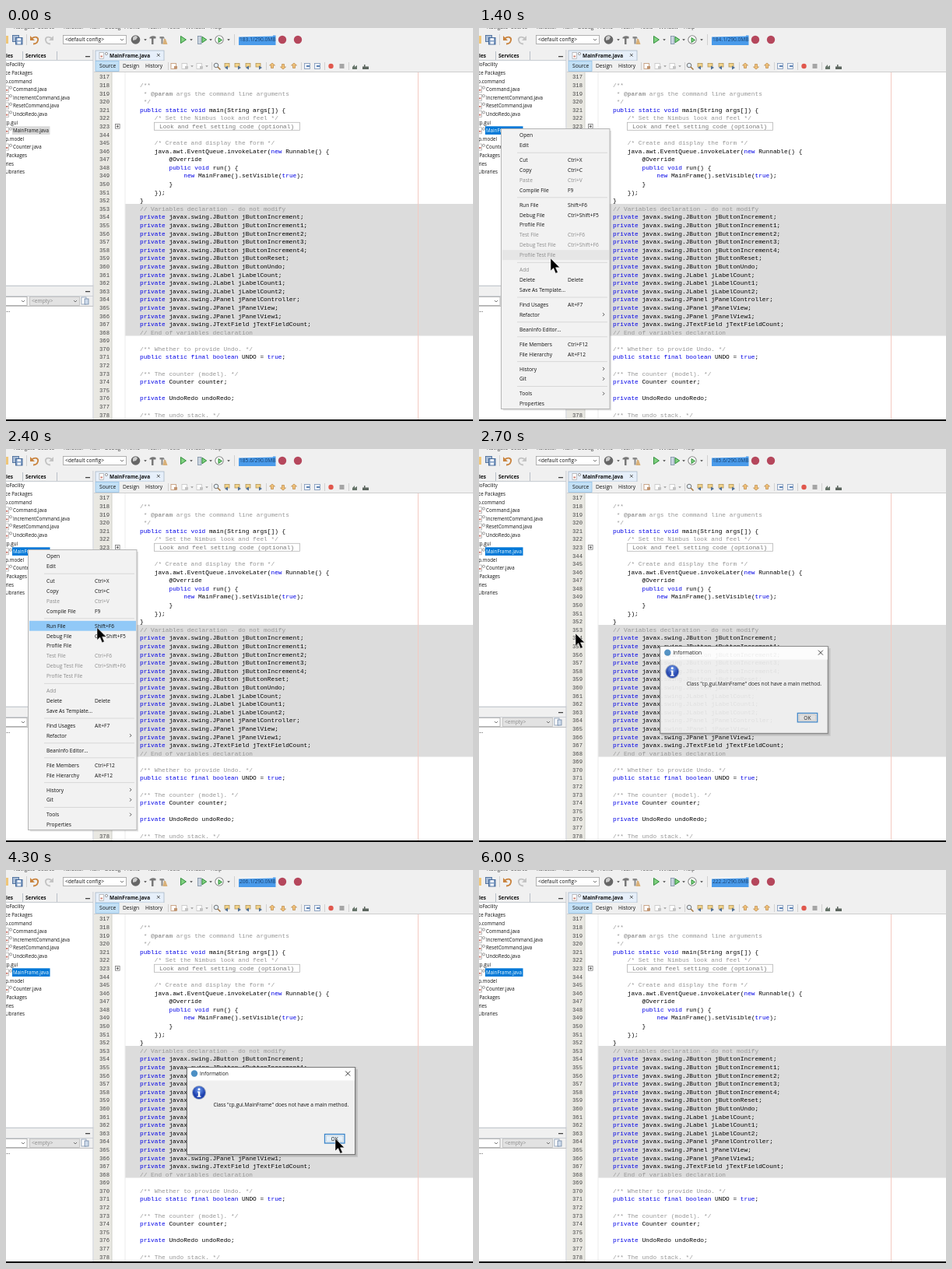
An HTML page that plays this animation: 600x505 px, repeating every 6.1 s.

```html
<!DOCTYPE html>
<html lang="en">
<head>
<meta charset="utf-8">
<title>IDE run file</title>
<style>
html, body { margin: 0; width: 100%; height: 100%; overflow: hidden; background: #fff; }
svg { display: block; width: 600px; height: 505px; }
text { font: 6.65px "Open Sans", "Noto Sans", sans-serif; white-space: pre; fill: #111; }
.code { font: 7.81px "Liberation Mono", monospace; }
.num { font: 7.2px "Liberation Mono", monospace; fill: #444; }
.tree { font-size: 6.2px; }
.b { font-weight: 700; font-size: 6.5px; }
.off { fill: #8b8b8b; }
</style>
</head>
<body>
<script>
const LOOP = 6100, STEP = 100;

// ---- markup helpers
const rect = (x, y, w, h, fill, more = '') =>
  `<rect x="${x}" y="${y}" width="${w}" height="${h}" fill="${fill}" ${more}/>`;
const path = (d, fill, more = '') => `<path d="${d}" fill="${fill}" ${more}/>`;
const line = (d, color, w = 1) => path(d, 'none', `stroke="${color}" stroke-width="${w}"`);
const dot = (x, y, r, fill, more = '') => `<circle cx="${x}" cy="${y}" r="${r}" fill="${fill}" ${more}/>`;
const text = (x, y, s, cls = '', more = '') =>
  `<text x="${x}" y="${y}" class="${cls}" ${more}>${s.replace(/</g, '&lt;')}</text>`;
const group = (id, body) => `<g id="${id}">${body}</g>`;
const drop = (x, y, c = '#444') => path(`M${x - 1.8} ${y - .8}h3.6l-1.8 2z`, c);
const chevron = (x, y) => line(`M${x - 2} ${y - 1}l2 2 2-2`, '#555', .8);
const vline = (x, y, h, c = '#d0d0d0') => rect(x, y, 1, h, c);

// ---- main toolbar
function toolbar() {
  const menus = [['Navigate', 10], ['Source', 41], ['Refactor', 74], ['Run', 108], ['Debug', 127],
    ['Profile', 152], ['Team', 182], ['Tools', 207], ['Window', 231], ['Help', 263]];
  const play = (x, y, s) => path(`M${x} ${y - s}v${2 * s}l${1.5 * s}-${s}z`, '#7fd07f', 'stroke="#2f8f3a" stroke-width="1"');
  return rect(0, 0, 600, 28, '#f0f0f0') +
    menus.map(([s, x]) => text(x, 1.2, s, '', 'opacity=".8"')).join('') +
    rect(0, 10, 3, 10, '#efc678') +
    rect(8.5, 9.5, 8, 8, '#a9bdd6', 'stroke="#4d6f9c" stroke-width=".9"') +
    rect(12.5, 12.5, 8.5, 8.5, '#7f9dc4', 'stroke="#3a5f92" stroke-width=".9"') +
    rect(14.5, 13, 4.5, 3, '#f2f5fa') + rect(14.5, 17.5, 4.5, 3, '#f2f5fa') +
    vline(26, 8, 14) +
    line('M33 13.5c5-4 9-1 8 2.500s-4 4.500-6 4.500', '#c9843f', 1.8) + path('M31 10v6h6z', '#c9843f') +
    line('M59 13.5c-5-4-9-1-8 2.500s4 4.500 6 4.500', '#c3c3c3', 1.8) + path('M61 10v6h-6z', '#c3c3c3') +
    rect(73.5, 9.5, 81, 11, '#fff', 'stroke="#a0a0a0" stroke-width=".8"') +
    text(76, 17.2, '<default config>') + chevron(149, 15) +
    dot(166.5, 15, 5.8, '#666') + path('M163 12q4-4 6 0l-2 3-4 1z', '#ccc') + drop(179, 15) +
    path('M184.500 12q3-3 8-1v2.500h-3v7.500h-2.500v-7.500h-2.500z', '#777') +
    path('M197.500 11h5l1.500 2.500h-2.500v7h-2v-7h-2z', '#888') + path('M203 14h2l2.500 7h-6z', '#d9b077') +
    play(224.5, 15, 4.6) + drop(238, 15) +
    rect(246.5, 10.5, 4.5, 10, '#c9d3df', 'stroke="#7c8ea3" stroke-width=".8"') + play(252, 15, 3.8) + drop(263, 15) +
    dot(274, 15, 5.2, '#fff', 'stroke="#8a8a8a" stroke-width="1.1"') + play(273, 15.5, 3) + drop(286, 15) +
    vline(293, 8, 14) +
    rect(298.5, 8.5, 48.5, 13.5, '#f3f3f3') + path('M299 11.500L343 10.500V9.500H346.500V22H299z', '#4a9bea') +
    text(300, 17.2, '', '', 'id="mem" style="fill:#17406f"') +
    dot(355, 15, 5.2, '#b5475c') + dot(375, 15, 5.2, '#b5475c');
}

// ---- left side panels
function side() {
  const cut = [['UndoFacility', 24, 47], ['Source Packages', 34, 57.6], ['cp.command', 33, 68.2],
    ['cp.gui', 15, 121.2], ['cp.model', 23, 142.4], ['Test Packages', 27, 163.6],
    ['Libraries', 10, 174.2], ['Test Libraries', 24, 184.8]];
  const files = [['Command', 78.8], ['IncrementCommand', 89.4], ['ResetCommand', 100],
    ['UndoRedo', 110.6], ['MainFrame', 131.8], ['Counter', 153]];
  const icon = y => rect(-1, y - 4, 4.5, 8, '#fff', 'stroke="#a5a5a5" stroke-width=".7"') +
    rect(0, y, 2.5, 2, '#cf8378') + dot(6, y - 2.2, 1.6, '#fff', 'stroke="#777" stroke-width=".7"');
  return rect(0, 28, 113, 475, '#fff') +
    rect(0, 28, 112, 14, '#f0f0f0') + vline(21, 30, 11, '#b9c0c8') + vline(65, 30, 11, '#b9c0c8') +
    rect(0, 41.3, 112, .8, '#b9c0c8') +
    text(9, 38, 'Files', 'b', 'text-anchor="end"') + text(25, 38, 'Services', 'b') + rect(102, 36, 6, 1.3, '#444') +
    cut.map(([s, x, y]) => text(x, y + 2.3, s, 'tree', 'text-anchor="end"')).join('') +
    rect(8, 126.3, 48.5, 10.6, '#d9d9d9', 'id="sel"') +
    files.map(([s, y]) => icon(y) + text(9, y + 2.3, s + '.java', 'tree', s === 'MainFrame' ? 'id="picked"' : '')).join('') +
    rect(0, 330, 113, 28, '#f0f0f0') + rect(0, 331, 112, .8, '#b9c0c8') + rect(0, 344, 112, .8, '#c6cbd1') +
    rect(102, 338, 6, 1.3, '#444') +
    rect(-5, 345.5, 32, 11, '#fff', 'stroke="#a5a5a5" stroke-width=".8"') + chevron(22, 351) +
    rect(30.5, 345.5, 64, 11, '#e2e2e2', 'stroke="#bebebe" stroke-width=".8"') +
    text(33, 353.4, '<empty>', 'off') + chevron(89, 351) +
    rect(97, 346, 6, 9, '#fff', 'stroke="#8297b0" stroke-width=".8"') + rect(101, 348, 5, 7, '#cfdcec', 'stroke="#6f87a5" stroke-width=".8"') +
    rect(0, 357, 112, .8, '#b5b5b5') + text(0, 364.5, '...') +
    vline(111.5, 28, 475, '#c2c6cb');
}

// ---- editor
const KEYWORDS = /\b(public|private|static|final|void|boolean|new|true)\b/g;
const field = (type, name) => `private javax.swing.J${type} j${name};`;
const SOURCE = [
  '', '/**', ' * @param args the command line arguments', ' */',
  'public static void main(String args[]) {', '    /* Set the Nimbus look and feel */', '',
  '', '    /* Create and display the form */',
  '    java.awt.EventQueue.invokeLater(new Runnable() {', '        @Override', '        public void run() {',
  '            new MainFrame().setVisible(true);', '        }', '    });', '}',
  '// Variables declaration - do not modify',
  ...['Increment', 'Increment1', 'Increment2', 'Increment3', 'Increment4', 'Reset', 'Undo']
    .map(s => field('Button', 'Button' + s)),
  ...['', '1', '2'].map(s => field('Label', 'LabelCount' + s)),
  ...['Controller', 'View', 'View1'].map(s => field('Panel', 'Panel' + s)),
  field('TextField', 'TextFieldCount'),
  '// End of variables declaration', '',
  '/** Whether to provide Undo. */', 'public static final boolean UNDO = true;', '',
  '/** The counter (model). */', 'private Counter counter;', '',
  'private UndoRedo undoRedo;', '', '/** The undo stack. */'
];

function codeLine(s, i) {
  const y = (65.4 + i * 10.59).toFixed(2);
  const body = s.trimStart(), x = 172 + (s.length - body.length) * 4.686;
  const note = /^[/*]/.test(body);
  const marked = note
    ? body.replace('@param', '<tspan font-weight="700">@param</tspan>')
    : body.replace(KEYWORDS, '<tspan fill="#0000e6">$1</tspan>');
  return text(120, y, String(i < 7 ? 317 + i : 337 + i), 'num') +
    `<text x="${x}" y="${y}" class="code" style="fill:${note ? '#969696' : '#000'}">${marked}</text>`;
}

function editTools() {
  const page = (x, c) => rect(x - 4, 45.5, 6.5, 7, '#fff', `stroke="${c}" stroke-width=".8"`) + rect(x, 49, 4, 3.5, c);
  const mark = (x, dir) => rect(x - 4, 45.5, 6, 4.5, '#f3d48a', 'stroke="#a98a4a" stroke-width=".7"') +
    path(`M${x + 4 * dir} 51l${-4 * dir}-2.500v5z`, '#4f6f96');
  const slant = (x, dir) => path(`M${x - 3.5} ${49 - dir}l3.500 ${-3 * dir} 3.500 ${3 * dir}h-2v${3.5 * dir}h-3v${-3.5 * dir}z`,
    '#f0c27a', 'stroke="#b98542" stroke-width=".7"');
  const shift = x => rect(x - 3.5, 45.5, 7, 7, '#eef2f8', 'stroke="#7c94b8" stroke-width=".8"') + rect(x - 1, 48, 4, 2, '#5d83b5');
  return page(216, '#c0936f') + page(230, '#c4c4c4') + drop(239, 49, '#999') + page(249, '#c4c4c4') + drop(258, 49, '#999') +
    [208, 264, 334, 379, 409, 440].map(x => vline(x, 44, 10)).join('') +
    dot(270, 48, 2.8, '#e4eef8', 'stroke="#666" stroke-width=".9"') + line('M272 50l3.500 3.500', '#a5783f', 1.5) +
    mark(285, -1) + mark(298, 1) + mark(312, -1) + mark(325, 1) +
    slant(342, 1) + slant(356, -1) + slant(370, 1) + shift(387) + shift(400) +
    dot(417.5, 49, 3.2, '#e0574c') + rect(428.500, 46, 6, 6, '#a5a5a5') +
    path('M445 53v-3l3-3v3l3-2v5z', '#66756a') + path('M458 53v-3.500h8v3.500z', '#5d665f') + rect(460, 47, 1.5, 3, '#5d665f');
}

function editor() {
  return rect(113, 28, 487, 29, '#f0f0f0') +
    rect(115, 29, 88, 13, '#e6effa', 'stroke="#a9b8c9" stroke-width=".8"') +
    rect(120, 31.5, 5.5, 8, '#fff', 'stroke="#a5a5a5" stroke-width=".7"') + rect(121.5, 35.5, 2.5, 2, '#cf8378') +
    dot(129, 33, 1.6, '#fff', 'stroke="#777" stroke-width=".7"') +
    text(133, 37.8, 'MainFrame.java', 'b') + line('M194 33l3.600 3.600m0-3.600l-3.600 3.600', '#444', .9) +
    rect(113, 42, 487, 14.5, '#f0f0f0') +
    rect(115, 42.5, 30, 13, '#c2e0f6', 'stroke="#93c1e6" stroke-width=".8"') +
    text(120, 51.4, 'Source') + text(150, 51.4, 'Design') + text(179, 51.4, 'History') + editTools() +
    rect(113, 56, 487, .8, '#c6c6c6') + rect(113, 57, 487, 446, '#fff') +
    rect(113, 57, 23, 446, '#e9e8e2') + vline(135.5, 57, 446, '#d0cfca') +
    rect(153, 226, 447, 169.5, '#dcdcdc') + vline(152.5, 57, 446, '#ebebeb') +
    vline(529, 57, 446, '#f3c9c2') +
    SOURCE.map(codeLine).join('') +
    rect(190.5, 121.3, 187, 10, '#fff', 'stroke="#b5b5b5" stroke-width=".8"') +
    text(197, 129, 'Look and feel setting code (optional)', 'code', 'style="fill:#777"') +
    rect(140.5, 123.5, 5.6, 5.6, '#fff', 'stroke="#777" stroke-width=".8"') + line('M141.6 126.3h3.4m-1.7-1.7v3.4', '#444', .8);
}

// ---- context menu: "-" separates, "!" disables, ">" has a submenu
const MENU = `Open;Edit;-;Cut|Ctrl+X;Copy|Ctrl+C;!Paste|Ctrl+V;Compile File|F9;-;Run File|Shift+F6;Debug File|Ctrl+Shift+F5;
Profile File;!Test File|Ctrl+F6;!Debug Test File|Ctrl+Shift+F6;!Profile Test File;-;!Add;Delete|Delete;Save As Template...;-;
Find Usages|Alt+F7;Refactor|>;-;BeanInfo Editor...;-;File Members|Ctrl+F12;File Hierarchy|Alt+F12;-;History|>;Git|>;-;
Tools|>;Properties`.replace(/\n/g, '').split(';');
const ROW = 12.9, rows = [];

function menu() {
  let y = 131.3, out = '';
  for (const item of MENU) {
    if (item === '-') {
      out += rect(49, y + 2.7, 116, .8, '#d2d2d2');
      y += 6.05;
      continue;
    }
    const off = item[0] === '!', [label, key = ''] = item.replace('!', '').split('|');
    const base = y + ROW / 2 + 2.4, cls = off ? 'off' : '';
    rows.push({ y, off });
    out += text(52, base, label, cls) +
      (key === '>' ? line(`M159 ${base - 4.6}l2 2-2 2`, '#333', .8) : text(114, base, key, cls));
    y += ROW;
  }
  return rect(31, 132, 139, 359.5, '#000', 'opacity=".12"') +
    rect(28.5, 129.5, 139.5, 360, '#f2f2f2', 'stroke="#b5b5b5"') +
    rect(30, 0, 137, ROW, '#91c9f7', 'id="hover"') + out;
}

function dialog() {
  return rect(234, 256, 218, 113, '#000', 'opacity=".1"') + rect(231, 253, 219.5, 114.5, '#000', 'opacity=".1"') +
    rect(232.5, 253.5, 216, 112, '#f0f0f0', 'stroke="#777"') + rect(233, 254, 215, 16.5, '#fff') +
    dot(242, 261.5, 4.2, '#4c8fc4') + text(249, 264, 'Information') +
    line('M436.2 258.5l6 6m0-6l-6 6', '#222', .9) +
    dot(248, 286, 9, '#9aa7bd') + dot(248, 286, 8, 'url(#ball)') +
    dot(248, 281.7, 1.5, '#fff') + path('M246 284.4h3.3v6h1.2v1.4h-5v-1.4h1.4v-4.6H246z', '#fff') +
    text(266.5, 304.4, 'Class "cp.gui.MainFrame" does not have a main method.') +
    rect(409.5, 339.5, 25.5, 11.5, '#e1e1e1', 'id="ok" stroke="#3b84c8" stroke-width="1.3"') +
    rect(411.5, 341.5, 21.5, 7.5, 'none', 'stroke="#888" stroke-width=".5" stroke-dasharray="1 1"') +
    text(417.5, 347.8, 'OK');
}

const arrow = path('M0 0v16l3.7-3.4 2.8 6.6 2.8-1.2-2.8-6.2h5.2z', '#000', 'stroke="#fff" stroke-width=".5"');

document.body.innerHTML = `<svg viewBox="0 0 600 505">
<defs><radialGradient id="ball" cy=".3"><stop offset="0" stop-color="#6f9df0"/><stop offset="1" stop-color="#1c3fae"/></radialGradient></defs>
${toolbar()}${side()}${editor()}${rect(0, 503, 600, 2, '#000')}
${group('menu', menu())}${group('dialog', dialog())}${group('cursor', arrow)}</svg>`;

// ---- motion
const $ = id => document.getElementById(id);
const PATH = [ // ms, x, y
  [100, 205, 330], [300, 150, 262], [600, 32, 136], [700, 28, 130], [1000, 28, 130], [1200, 70, 232],
  [1300, 88, 287], [1400, 92, 296], [1700, 97, 338], [1900, 97, 336], [2000, 97, 326], [2300, 116, 229],
  [2500, 118, 230], [2700, 124, 237], [3000, 124, 237], [3500, 220, 272], [4000, 402, 336],
  [4200, 422, 344], [4300, 423, 345], [5600, 423, 345]
];
const MEMORY = [[0, 183.1], [700, 184.1], [1700, 185.6], [2900, 190.3], [3600, 206.1], [4900, 214.7], [5900, 222.2]];
const FADE = [[0, 0], [2600, .45], [2700, .93], [2800, 1], [4800, .5], [4900, 0]];

const held = (table, t) => table.findLast(k => k[0] <= t)[1];

function pointer(t) {
  const i = PATH.findIndex(k => k[0] > t);
  if (i < 1) return PATH[i < 0 ? PATH.length - 1 : 0].slice(1);
  const a = PATH[i - 1], b = PATH[i], p = (t - a[0]) / (b[0] - a[0]);
  return [a[1] + (b[1] - a[1]) * p, a[2] + (b[2] - a[2]) * p];
}

const show = (id, on) => $(id).setAttribute('display', on ? 'inline' : 'none');

function draw(t) {
  const picked = t >= 700;
  $('sel').setAttribute('fill', picked ? '#0078d7' : '#d9d9d9');
  $('picked').style.fill = picked ? '#fff' : '#111';
  $('mem').textContent = held(MEMORY, t).toFixed(1) + '/290.0MB';

  const [x, y] = pointer(t);
  show('cursor', t >= 100 && t < 5600);
  $('cursor').setAttribute('transform', `translate(${x} ${y})`);

  // the highlighted row trails the pointer by one step
  const [hx, hy] = pointer(t - STEP);
  const row = hx > 30 && rows.find(r => hy >= r.y && hy < r.y + ROW);
  show('menu', t >= 1000 && t < 2500);
  show('hover', row);
  if (row) {
    $('hover').setAttribute('y', row.y);
    $('hover').setAttribute('fill', row.off ? '#e6e6e6' : '#91c9f7');
  }

  const fade = held(FADE, t), size = .92 + .08 * Math.sqrt(fade);
  show('dialog', fade);
  $('dialog').setAttribute('opacity', fade);
  $('dialog').setAttribute('transform', `translate(340.5 309.5) scale(${size}) translate(-340.5 -309.5)`);
  $('ok').setAttribute('fill', t >= 4700 ? '#cce4f7' : t >= 4300 ? '#e5f1fb' : '#e1e1e1');
}

const start = performance.now();
function tick() {
  const t = (performance.now() - start) % LOOP;
  draw(Math.floor(t / STEP) * STEP);
  requestAnimationFrame(tick);
}
tick();
</script>
</body>
</html>
```
